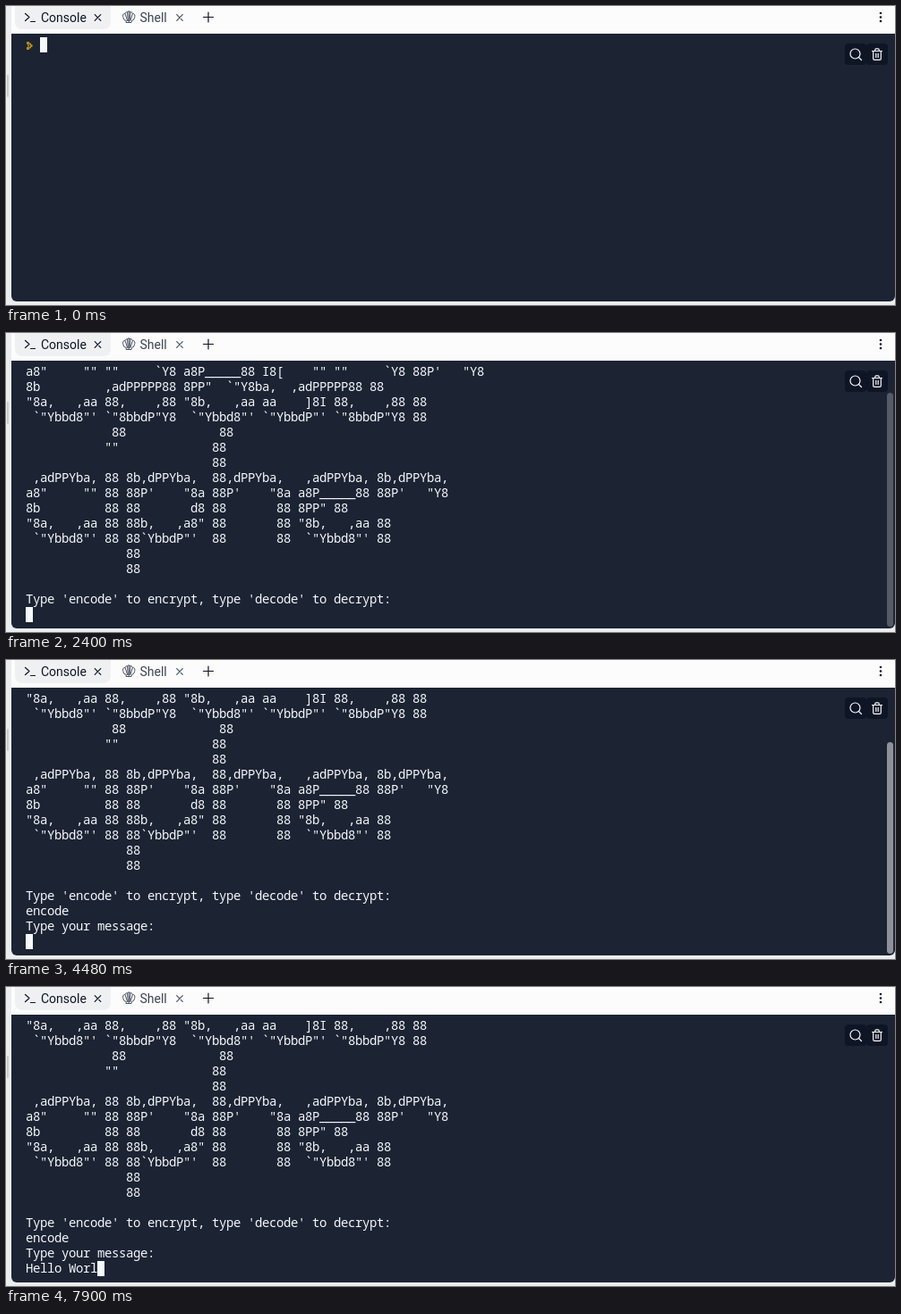
Recreate the animation shown at these times as an HTML page. Size 993x335 px, loop 8 s.

```html
<!DOCTYPE html>
<html lang="en">
<head>
<meta charset="utf-8">
<title>Console</title>
<style>
  html, body { margin: 0; width: 100%; height: 100%; overflow: hidden; background: #ebedef; }
  svg { display: block; }
  .tab { font: 14px Roboto, "Open Sans", sans-serif; }
  .term text {
    font: 14px "Noto Sans Mono", "DejaVu Sans Mono", monospace;
    letter-spacing: -0.4px; white-space: pre; fill: #f5f9fc;
  }
  .line { fill: none; stroke: #0e1525; stroke-width: 1.2; stroke-linecap: round; stroke-linejoin: round; }
  .light { stroke: #f5f9fc; }
  .soft { stroke: #4a5261; stroke-width: 1; }
</style>
</head>
<body>
<svg width="993" height="335" viewBox="0 0 993 335">
  <rect width="993" height="335" fill="#ebedef"/>
  <rect x="1" y="77" width="2" height="25" rx="1" fill="#c8ccd1"/>

  <!-- Tab bar -->
  <rect x="6" width="987" height="31" fill="#fcfcfc"/>
  <path d="M10 0H117V18a8 8 0 0 1-8 8H18a8 8 0 0 1-8-8Z" fill="#eff0f2"/>
  <path class="line" d="M21.5 8.5l4.5 4-4.5 4M27.5 17.5h5"/>
  <text class="tab" x="39" y="17.5" fill="#0e1525">Console</text>
  <path class="line" d="M99.2 9.7l6.6 6.6m0-6.6l-6.6 6.6"/>
  <path class="line soft" d="M134.5 18.5h5.500l.5-2.200 2-.8c1-2 1.700-4 1.300-5.500-.6-1.300-1.500-1.700-2.300-1.600-.5-1.300-1.500-1.800-2.500-1.500-1-1.200-2.500-1.200-3.500 0-1-.3-2 .2-2.500 1.500-.8-.1-1.700.3-2.300 1.600-.4 1.500.3 3.500 1.300 5.500l2 .8Z
    M137.200 6.200v12M135.500 7l.9 9.500M139 7l-.9 9.500M133 8.500l2.700 8M141.500 8.500l-2.700 8"/>
  <text class="tab" x="149.500" y="17.5" fill="#3c4453">Shell</text>
  <path class="line" d="M190.700 9.700l6.600 6.600m0-6.600l-6.600 6.600" style="stroke:#4a5261"/>
  <path class="line" d="M226 7v11M220.500 12.500h11"/>
  <g fill="#0e1525">
    <circle cx="977" cy="8" r="1.300"/><circle cx="977" cy="12.500" r="1.300"/><circle cx="977" cy="17" r="1.300"/>
  </g>

  <!-- Terminal -->
  <path d="M6 31H993V325a6 6 0 0 1-6 6H12a6 6 0 0 1-6-6Z" fill="#1c2333"/>
  <g class="term">
    <path id="prompt" fill="#b08a1c" d="M23 40h3v3h-3zM26 41.500h2v2h-2zM27 43h2.500v3H27zM24 43.500h2v2h-2zM26 45.500h2v2h-2zM23 46h3v3h-3z"/>
    <g id="rows"></g>
    <rect id="caret" width="8" height="17" fill="#f5f9fc"/>
  </g>
  <rect x="937" y="42" width="24" height="24" rx="4" fill="#0e1525"/>
  <rect x="961" y="42" width="24" height="24" rx="4" fill="#0e1525"/>
  <circle class="line light" cx="948.500" cy="53.500" r="5.500"/>
  <path class="line light" d="M952.500 57.500l3 3"/>
  <path class="line light" d="M967.500 50.500h11M968.700 50.500v8.500a1.300 1.300 0 0 0 1.300 1.300h6a1.300 1.300 0 0 0 1.300-1.300v-8.500M970.800 50.500v-1.500a1.200 1.200 0 0 1 1.200-1.200h2a1.200 1.200 0 0 1 1.200 1.200v1.500M971.800 53.300v4.200M974.200 53.300v4.200"/>
  <rect id="bar" x="984" width="7" rx="3.500" fill="#fff"/>

  <!-- Text pointer, centred on its own origin -->
  <g id="pointer" fill="none" stroke-linecap="round">
    <path id="beam" stroke="#fff" stroke-width="3" d="M-3-7.500Q0-7.500 0-5.500Q0-7.500 3-7.500M0-5.500V5.500M-3 7.500Q0 7.500 0 5.500Q0 7.500 3 7.500M-1.500 1.500h3"/>
    <use href="#beam" id="beamCore"/>
    <path stroke="#10151f" stroke-width="1.100" d="M-3-7.500Q0-7.500 0-5.500Q0-7.500 3-7.500M0-5.500V5.500M-3 7.500Q0 7.500 0 5.500Q0 7.500 3 7.500M-1.500 1.500h3"/>
  </g>
</svg>
<script>
const LOOP = 8000, LEFT = 22, TOP = 35, CELL = 8, ROW = 17, VISIBLE = 17;
const $ = id => document.getElementById(id);

const banner = String.raw`
a8"     "" ""     ~Y8 a8P_____88 I8[    "" ""     ~Y8 88P'   "Y8
8b         ,adPPPPP88 8PP"  ~"Y8ba,  ,adPPPPP88 88
"8a,   ,aa 88,    ,88 "8b,   ,aa aa    ]8I 88,    ,88 88
 ~"Ybbd8"' ~"8bbdP"Y8  ~"Ybbd8"' ~"YbbdP"' ~"8bbdP"Y8 88
            88             88
           ""             88
                          88
 ,adPPYba, 88 8b,dPPYba,  88,dPPYba,   ,adPPYba, 8b,dPPYba,
a8"     "" 88 88P'    "8a 88P'    "8a a8P_____88 88P'   "Y8
8b         88 88       d8 88       88 8PP" 88
"8a,   ,aa 88 88b,   ,a8" 88       88 "8b,   ,aa 88
 ~"Ybbd8"' 88 88~YbbdP"'  88       88  ~"Ybbd8"' 88
              88
              88

Type 'encode' to encrypt, type 'decode' to decrypt:`.slice(1).replaceAll('~', '`').split('\n');

// [time, characters typed so far]
const firstKeys = [[0, 0], [3440, 1], [3590, 3], [3890, 5], [4180, 6]];
const secondKeys = [[0, 0], [6420, 2], [6560, 3], [6710, 4], [6860, 5], [7010, 6],
  [7300, 7], [7450, 8], [7600, 9], [7900, 10]];
// [time, x, y]
const pointerStops = [[450, 233.5, 176], [600, 222.5, 213], [1650, 144.5, 192]];
const START = 1800, ENTER = 4480;

const latest = (steps, t) => steps.filter(s => s[0] <= t).pop();
const typed = (word, keys, t) => word.slice(0, latest(keys, t)[1]);

const rows = Array.from({ length: VISIBLE }, (_, i) => {
  const el = document.createElementNS('http://www.w3.org/2000/svg', 'text');
  el.setAttribute('x', LEFT);
  el.setAttribute('y', TOP + i * ROW + 13);
  return $('rows').appendChild(el);
});

function set(el, attrs) {
  for (const key in attrs) el.setAttribute(key, attrs[key]);
}

function linesAt(t) {
  if (t < START) return [];
  const lines = [...banner, typed('encode', firstKeys, t)];
  if (t >= ENTER) lines.push('Type your message:', typed('Hello World', secondKeys, t));
  return lines.slice(-VISIBLE);
}

// Fully shown after a scroll, briefly half faded, then gone
function barOpacity(t) {
  if (t < START) return 0;
  if (t < ENTER) return t < 2400 ? 0.5 : t < 2540 ? 0.25 : 0;
  return t < 5070 ? 0.5 : t < 5220 ? 0.25 : 0;
}

function draw(t) {
  const lines = linesAt(t), running = t >= START;
  rows.forEach((el, i) => {
    const text = lines[i] || '';
    if (el.textContent !== text) el.textContent = text;
  });
  set($('prompt'), { visibility: running ? 'hidden' : 'visible' });
  set($('caret'), running
    ? { x: LEFT + lines[VISIBLE - 1].length * CELL, y: TOP + (VISIBLE - 1) * ROW }
    : { x: LEFT + 2 * CELL, y: TOP });

  const barTop = t < ENTER ? 67 : 92;
  set($('bar'), { y: barTop, height: 329 - barTop, opacity: barOpacity(t) });

  const stop = running ? null : latest(pointerStops, t);
  set($('pointer'), { visibility: stop ? 'visible' : 'hidden' });
  if (stop) set($('pointer'), { transform: `translate(${stop[1]} ${stop[2]})` });
}

const origin = performance.now();
function frame() {
  draw((performance.now() - origin) % LOOP);
  requestAnimationFrame(frame);
}
frame();
</script>
</body>
</html>
```
